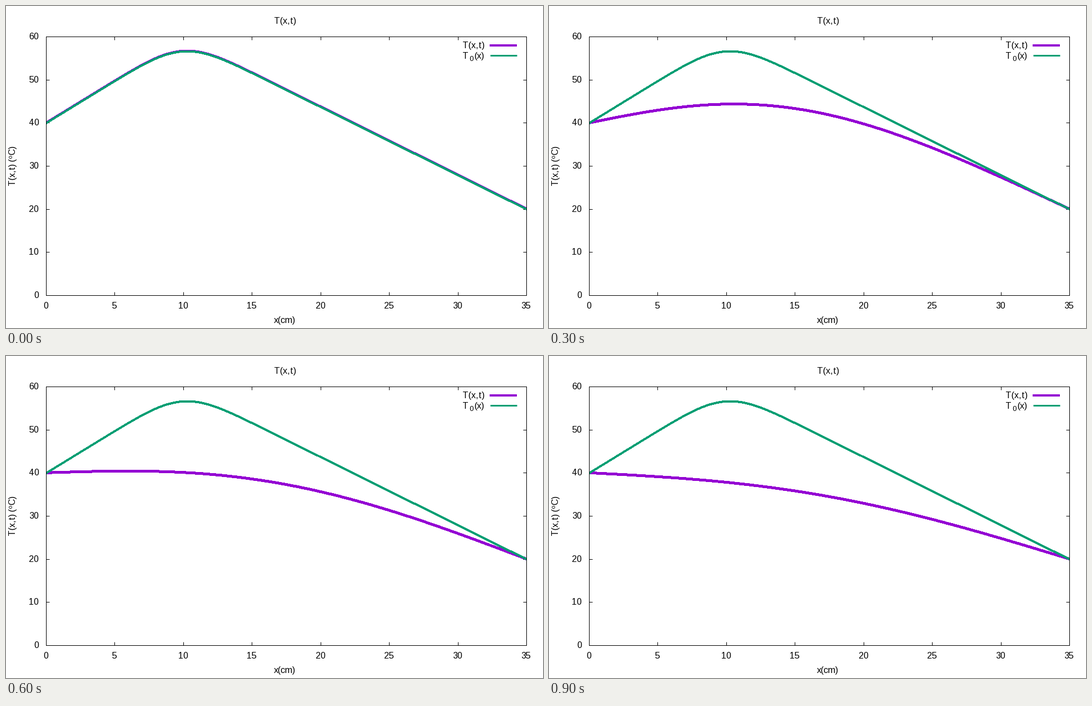
Recreate the animation shown at these times as a matplotlib script. Size 966 by 580 pixels, loop 1 s.

```python
import numpy as np
import matplotlib.pyplot as plt
from matplotlib.animation import FuncAnimation
from matplotlib.patches import Polygon, Rectangle

WIDTH, HEIGHT, DPI = 966, 580, 64
PT = 72 / DPI  # points per pixel
LEFT, RIGHT, TOP, BOTTOM = 72, 936, 55, 521
PURPLE, GREEN = "#9400d3", "#009e73"

LENGTH = 35.0        # rod length, cm
T_LEFT, T_RIGHT = 40.0, 20.0
HEAT, CENTRE, SPREAD = 3.53, 10.0, 2.05  # Gaussian heat source
DECAY = 0.1625       # decay of the first mode per step

plt.rcParams.update({
    "font.family": "Liberation Sans",
    "text.hinting": "force_autohint",
    "text.hinting_factor": 1,
})
fig = plt.figure(figsize=(WIDTH / DPI, HEIGHT / DPI), dpi=DPI, facecolor="white")
ax = fig.add_axes([0, 0, 1, 1])
ax.set_xlim(0, WIDTH)
ax.set_ylim(HEIGHT, 0)
ax.axis("off")


def px(x):
    return LEFT + x * (RIGHT - LEFT) / LENGTH


def py(temp):
    return BOTTOM - temp * (BOTTOM - TOP) / 60


def stroke(xs, ys, width=1, color="black"):
    ax.plot(xs, ys, color=color, lw=width * PT, solid_capstyle="butt")


def label(x, baseline, text, ha="left", size=16, rotation=0):
    ax.text(x, baseline, text, ha=ha, va="baseline", fontsize=size * PT,
            color="black", rotation=rotation, rotation_mode="anchor")


x = np.linspace(0, LENGTH, 351)
n = np.arange(1, 41)
k = n * np.pi / LENGTH
modes = np.sin(np.outer(x, k))
weights = (2 * HEAT / (LENGTH * k**2) * np.sin(k * CENTRE)
           * np.exp(-(k * SPREAD) ** 2 / 2))


def temperature(step):
    """Heat equation with fixed ends after the source is switched off."""
    steady = T_LEFT + (T_RIGHT - T_LEFT) * x / LENGTH
    return steady + modes @ (weights * np.exp(-DECAY * n**2 * step))


def band(step, above, below):
    """Outline of the curve as a pen of constant vertical thickness."""
    xs, ys = px(x) + 0.5, py(temperature(step))
    return np.column_stack([np.append(xs, xs[::-1]),
                            np.append(ys - above, (ys + below)[::-1])])


def curve(outline, color, zorder):
    return ax.add_patch(Polygon(outline, facecolor=color, linewidth=0,
                                antialiased=False, zorder=zorder))


# Frame and mirrored ticks
ax.add_patch(Rectangle((LEFT, TOP), RIGHT - LEFT, BOTTOM - TOP, fill=False,
                       edgecolor="black", linewidth=PT, zorder=5))
for value in range(0, 36, 5):
    tx = round(px(value))
    stroke([tx, tx], [BOTTOM, BOTTOM - 6])
    stroke([tx, tx], [TOP, TOP + 6])
    label(tx, 545, str(value), "center")
for value in range(0, 61, 10):
    ty = round(py(value))
    stroke([LEFT, LEFT + 6], [ty, ty])
    stroke([RIGHT, RIGHT - 6], [ty, ty])
    label(59.5, ty + 5, str(value), "right")

# Titles
label(502, 32, "T(x,t)", "center")
label(501.5, 571.5, "x(cm)", "center")
label(17.5, 324.5, "T(x,t) (ºC)", rotation=90)

# Legend
label(860.5, 76, "T(x,t)", "right")
label(821, 95, "T")
label(833, 99, "0", size=12.8)
label(860.5, 95, "(x)", "right")
stroke([870, 919], [71, 71], 4, PURPLE)
stroke([871, 919], [89, 89], 3, GREEN)

# Curves
current = curve(band(0, 2, 2), PURPLE, zorder=3)
curve(band(0, 1, 2), GREEN, zorder=4)


def update(step):
    current.set_xy(band(step, 2, 2))
    return (current,)


anim = FuncAnimation(fig, update, frames=10, interval=100, repeat=True)
plt.show()
```
